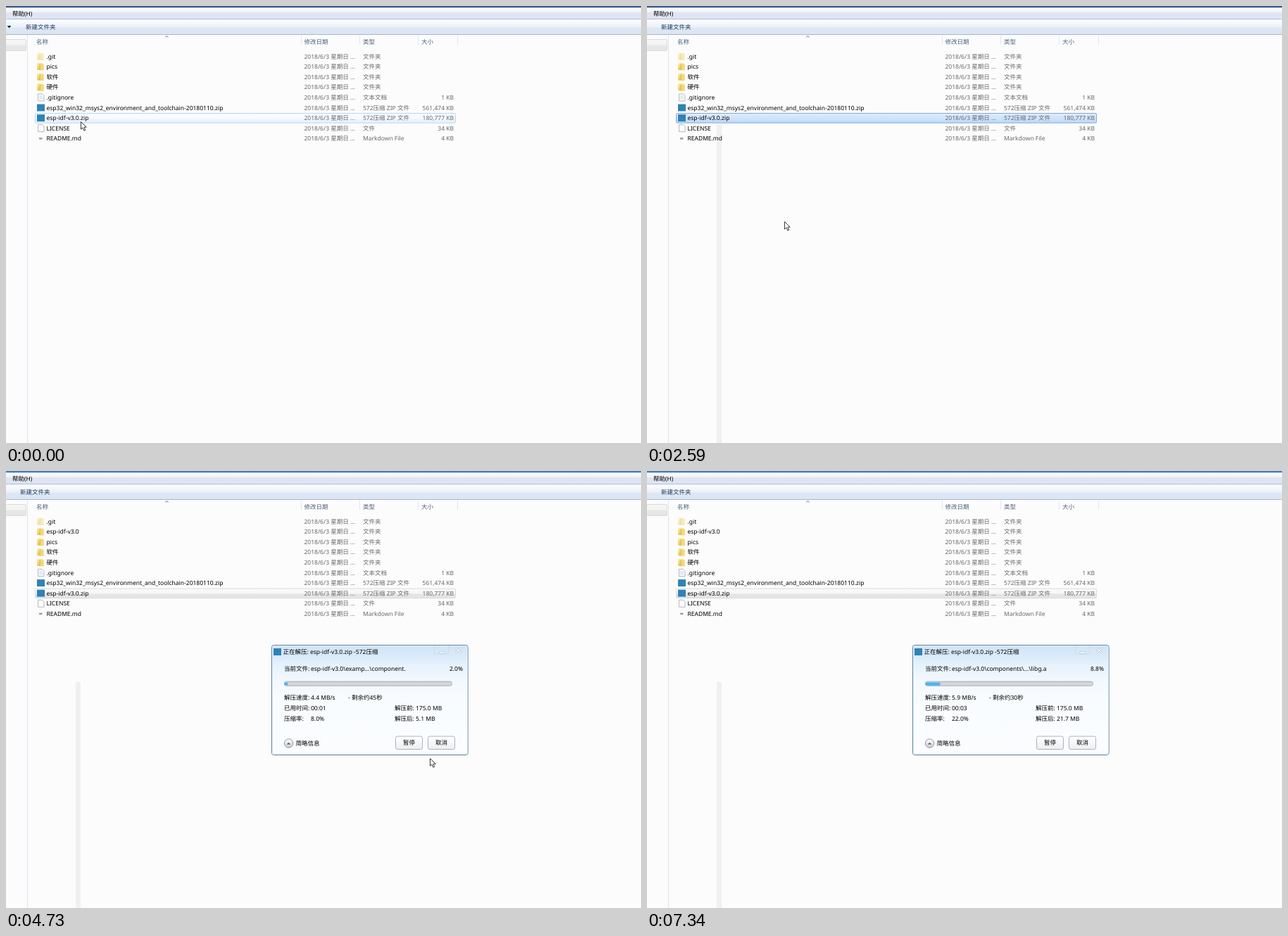
Animation, 902 px wide and 621 px high, one loop 7440 ms. Source, as an HTML page:

```html
<!DOCTYPE html>
<html lang="zh-CN">
<head>
<meta charset="utf-8">
<title>解压演示</title>
<style>
html, body { margin: 0; width: 100%; height: 100%; overflow: hidden; background: #fcfcfc; }
svg { display: block; }
text {
  font: 8.5px 'Noto Sans', 'Noto Sans CJK SC', 'Noto Sans CJK', sans-serif;
  text-rendering: geometricPrecision; white-space: pre; fill: #000;
}
.meta { fill: #686868; }
.head { fill: #4c607a; }
.bar { fill: #1e395b; }
.medium { font-weight: 500; }
.bold { font-weight: 700; }
</style>
</head>
<body>
<svg id="stage" width="902" height="621" viewBox="0 0 902 621"></svg>
<script>
const LOOP = 7440;
const ROW = 14.6;

// Drawing helpers; text is placed by its vertical centre.
const text = (x, y, s, attrs = '') => `<text x="${x}" y="${y + 3.1}" ${attrs}>${s}</text>`;
const rect = (x, y, w, h, fill, attrs = '') =>
  `<rect x="${x}" y="${y}" width="${w}" height="${h}" fill="${fill}" ${attrs}/>`;
const box = (x, y, w, h, fill, stroke, r = 0, attrs = '') =>
  rect(x + .5, y + .5, w - 1, h - 1, fill, `stroke="${stroke}" rx="${r}" ${attrs}`);
const disc = (x, y, r, fill, attrs = '') => `<circle cx="${x}" cy="${y}" r="${r}" fill="${fill}" ${attrs}/>`;
const path = (d, fill, attrs = '') => `<path d="${d}" fill="${fill}" ${attrs}/>`;
const group = (id, body) => `<g id="${id}">${body}</g>`;
const gradient = (id, ...stops) =>
  `<linearGradient id="${id}" x2="0" y2="1">${stops.map(([at, color]) =>
    `<stop offset="${at}" stop-color="${color}"/>`).join('')}</linearGradient>`;

const defs = '<defs>' +
  gradient('activeEdge', [0, '#4a74ab'], [.6, '#2c4d7e'], [1, '#56749f']) +
  gradient('idleEdge', [0, '#4f8acb'], [.6, '#3a74b8'], [1, '#6b95c6']) +
  gradient('menubar', [0, '#fcfdff'], [.35, '#f1f3fa'], [.5, '#dfe4f2'], [1, '#dfe5f3']) +
  gradient('toolbar', [0, '#fafcfe'], [.48, '#e9f0f9'], [.52, '#dee8f5'], [1, '#dce6f3']) +
  gradient('nav', [0, '#f8f8f8'], [.5, '#f1f1f1'], [.52, '#e7e7e7'], [1, '#e6e6e6']) +
  gradient('hover', [0, '#fbfdff'], [.55, '#f6fafe'], [.65, '#ebf4fd'], [1, '#e8f2fd']) +
  gradient('chosen', [0, '#dfedfd'], [1, '#bfd9fb']) +
  gradient('dull', [0, '#fafafa'], [.5, '#f6f6f6'], [.6, '#e4e4e4'], [1, '#e5e5e5']) +
  gradient('folder', [0, '#fbeaa0'], [1, '#e7c34e']) +
  gradient('dialogFill', [0, '#cfe4f6'], [.1, '#d9ebfa'], [.18, '#e6f2fc'], [.32, '#f2f8fe'], [.5, '#f9fcff'], [1, '#fbfdff']) +
  gradient('track', [0, '#c6cacd'], [.5, '#d8dadc'], [1, '#cdd0d2']) +
  gradient('fill', [0, '#9fd6f8'], [.5, '#4aa9e8'], [1, '#6cc1f4']) +
  gradient('button', [0, '#ffffff'], [1, '#eceff2']) +
  gradient('knob', [0, '#ffffff'], [1, '#c9cdd1']) + '</defs>';

const icons = {
  folder: y => rect(44.3, y - 5, 8.5, 10, 'url(#folder)', 'rx=".6"') +
    rect(48.3, y - 3.5, 5.5, 9, '#f3d878', 'rx=".6"') + rect(47.7, y - 4, .8, 9, '#d3ab48'),
  pale: y => `<g opacity=".5">${icons.folder(y)}</g>`,
  page: y => path(`M45.5 ${y - 5}h6l2.5 2.5v7.5h-8.5z`, '#fff', 'stroke="#a2a6aa" stroke-width=".8"'),
  lines: y => icons.page(y) + path(`M47 ${y - 2}h4.5m-4.5 2h5.5m-5.5 2h5.5`, 'none', 'stroke="#b9c4cc" stroke-width=".7"'),
  zip: y => rect(44, y - 5, 11, 10, '#2f83b5'),
  note: y => rect(47, y - 1.2, 4.5, 2.4, '#9c9c9c')
};

const ARCHIVE = '572压缩 ZIP 文件';
const extracted = ['folder', 'esp-idf-v3.0', '文件夹', ''];
const files = [
  ['pale', '.git', '文件夹', ''],
  ['folder', 'pics', '文件夹', ''],
  ['folder', '软件', '文件夹', ''],
  ['folder', '硬件', '文件夹', ''],
  ['lines', '.gitignore', '文本文档', '1 KB'],
  ['zip', 'esp32_win32_msys2_environment_and_toolchain-20180110.zip', ARCHIVE, '561,474 KB'],
  ['zip', 'esp-idf-v3.0.zip', ARCHIVE, '180,777 KB'],
  ['page', 'LICENSE', '文件', '34 KB'],
  ['note', 'README.md', 'Markdown File', '4 KB']
];
const fileList = rows => rows.map(([icon, name, kind, size], i) => {
  const y = 71.5 + i * ROW;
  return icons[icon](y) + text(57.5, y, name) + text(423.5, y, '2018/6/3 星期日 ...', 'class="meta"') +
    text(507, y, kind, 'class="meta"') + text(636, y, size, 'class="meta" text-anchor="end"');
}).join('');
const highlight = (id, row, fill, stroke) =>
  group(id, box(41, 64.4 + row * ROW, 598, ROW, `url(#${fill})`, stroke, 1.5));

const chrome =
  group('activeTitle', rect(0, 0, 902, 2.6, 'url(#activeEdge)')) +
  group('idleTitle', rect(0, 0, 902, 2.6, 'url(#idleEdge)')) +
  rect(0, 2.5, 902, 15.5, 'url(#menubar)') + rect(0, 18, 902, 1, '#b5bfd3') +
  rect(0, 19, 902, 2, '#f4f7fb') + rect(0, 21, 902, 19, 'url(#toolbar)') + rect(0, 40, 902, 1, '#a5b6cc') +
  text(9, 11, '帮助(H)') +
  group('wideBar', path('M1.5 28h6l-3 3.4z', '#1e2f45') + text(28, 30, '新建文件夹', 'class="bar"')) +
  group('slimBar', text(20, 30, '新建文件夹', 'class="bar"')) +
  box(-2, 47, 31, 17, 'url(#nav)', '#dadada', 1.5) + rect(30, 41, 1, 580, '#d9e5f3') +
  [419, 502, 585, 641].map(x => rect(x, 42, 1, 13, '#e1e7ee')).join('') +
  path('M226.5 44.5l2-2 2 2', 'none', 'stroke="#56636f"') +
  [[43, '名称'], [423.5, '修改日期'], [507, '类型'], [590, '大小']]
    .map(([x, s]) => text(x, 50.5, s, 'class="head"')).join('');

const square = color => y => rect(111, y - 5, 11, 10, color);
const round = color => y => disc(116, y, 5.6, color);
const zip = square('#2f83b5'), compare = round('#555'), guard = round('#8cc92b');
const SEPARATOR = null;
const menuItems = [
  ['打开(O)'], ['用记事本打开该文件'], ['管理员取得所有权'],
  ['Open with Dovu', square('#1f7fcb')], ['使用VuPost发送', round('#3a9be0')], SEPARATOR,
  ['用572压缩打开(Q)', zip], [''], ['解压到当前文件夹(X)', zip], ['解压到 esp-idf-v3.0\\ (E)', zip], SEPARATOR,
  ['打开方式(H)...'], SEPARATOR,
  ['共享(H)', , true], SEPARATOR,
  ['比较选定项目', compare], SEPARATOR,
  ['使用 572解除占用', square('#efc647')], ['使用 572强力删除', square('#8f86e6')],
  ['使用 572进行木马云查杀', guard], ['使用 572管理右键菜单', guard], SEPARATOR,
  ['手动选择项目', compare, true], ['还原以前的版本(V)'], SEPARATOR,
  ['发送到(N)', , true], SEPARATOR,
  ['剪切(T)'], ['复制(C)'], ['粘贴(P)'], SEPARATOR,
  ['创建快捷方式(S)'], ['删除(D)'], ['重命名(M)'], SEPARATOR,
  ['属性(R)']
];
function contextMenu() {
  let y = 173.2;
  const rows = menuItems.map(item => {
    if (!item) {
      y += 5.4;
      return rect(129, y - 10.6, 130, 1, '#dedfdf');
    }
    const [label, icon, more] = item;
    const row = (icon ? icon(y) : '') + text(130.5, y, label, y < 174 ? 'class="bold"' : '') +
      (more ? path(`M250 ${y - 2.5}v5l3-2.5z`, '#111') : '');
    y += 15.4;
    return row;
  }).join('');
  const glow = (id, top) => group(id, box(109, top, 151, 15, '#e5eef9', '#aecff7', 1.5));
  return box(106.3, 163.5, 155.2, 470, '#f1f1f1', '#979797') + rect(127, 165, 1, 456, '#e6e6e6') +
    rect(128, 165, 1, 456, '#f8f8f8') + glow('glowFirst', 166) + glow('glowExtract', 294) + rows;
}

const value = (id, x, y, attrs) => text(x, y, '', `id="${id}" ${attrs || ''}`);
const button = (x, label) => box(x, 376.5, 39, 19.5, 'url(#button)', '#a9b3bc', 2.5) +
  text(x + 19.5, 386, label, 'class="medium" text-anchor="middle"');
const dialog =
  box(377, 247, 279.6, 157, 'url(#dialogFill)', '#56809f', 3) +
  box(378, 248, 277.6, 155, 'none', '#f4faff', 2, 'opacity=".7"') +
  rect(380, 252, 11, 10, '#2f83b5') + text(393.5, 257, '正在解压: esp-idf-v3.0.zip -572压缩', 'fill="#33404c"') +
  path('M608.5 248v10q0 2 2 2h16q2 0 2-2v-10', 'none', 'stroke="#c3d8e9" stroke-width=".8"') +
  rect(615, 257, 8, 2.4, '#fff', 'stroke="#a7b7c4" stroke-width=".6"') +
  path('M639 252l7 6m0-6l-7 6', 'none', 'stroke="#a7b7c4" stroke-width="2.6"') +
  path('M639 252l7 6m0-6l-7 6', 'none', 'stroke="#fff" stroke-width="1.4"') +
  box(395, 298.6, 239, 7.2, 'url(#track)', '#b2b6b9', 3) +
  rect(395.5, 299.2, 1, 6, 'url(#fill)', 'id="bar" rx="2"') +
  [[395, 281, '当前文件:'], [395, 321.5, '解压速度:'], [395, 337, '已用时间:'], [395, 352.3, '压缩率:'],
    [552, 337, '解压前:'], [552, 352.3, '解压后:'], [582, 337, '175.0 MB']].map(a => text(...a)).join('') +
  value('file', 433, 281) + value('percent', 649, 281, 'text-anchor="end"') + value('speed', 433, 321.5) +
  value('left', 486, 321.5) + value('elapsed', 433, 337) + value('ratio', 433, 352.3) + value('after', 582, 352.3) +
  group('controls', disc(401.5, 387, 6.2, 'url(#knob)', 'stroke="#8e969d"') +
    path('M398.5 388.5l3-2.5 3 2.5z', '#555') + text(411.5, 387, '简略信息', 'class="medium"') +
    button(553, '暂停') + button(599, '取消'));

const pointer = group('pointer',
  path('M.5 .5v10.6l2.5-2.2 1.8 4.2 1.9-.8-1.8-4.1h3.3z', '#fff', 'stroke="#222" stroke-width=".9"') +
  group('busy', disc(9.5, .5, 4.5, 'none', 'stroke="#8fdcdc" stroke-width="2"') +
    path('M5 .5A4.5 4.5 0 0 1 13 -2.3M6.3 3.7A4.5 4.5 0 0 0 12 4.2', 'none', 'stroke="#1f9d9d" stroke-width="1.8"')));

document.getElementById('stage').innerHTML = defs + rect(0, 0, 902, 621, '#fcfcfc') + chrome +
  rect(99, 168, 7, 453, '#f0f0f0', 'id="strip"') +
  highlight('rowHover', 6, 'hover', '#b8d6f5') + highlight('rowChosen', 6, 'chosen', '#82a9d6') +
  highlight('rowDull', 6, 'dull', '#d9d9d9') + highlight('rowMoved', 7, 'dull', '#d9d9d9') +
  group('listBefore', fileList(files)) +
  group('listAfter', fileList([files[0], extracted, ...files.slice(1)])) +
  group('menu', contextMenu()) + group('dialog', dialog) + pointer;

const el = id => document.getElementById(id);

// Visible spans: element, from, until.
const spans = [
  ['activeTitle', 0, 3330], ['idleTitle', 3330, LOOP],
  ['wideBar', 0, 310], ['slimBar', 310, LOOP],
  ['rowHover', 0, 310], ['rowChosen', 310, 3330], ['rowDull', 3330, 4070], ['rowMoved', 4070, LOOP],
  ['listBefore', 0, 4070], ['listAfter', 4070, LOOP],
  ['strip', 1170, LOOP], ['menu', 1170, 2590], ['glowFirst', 1350, 1600], ['glowExtract', 2090, 2590],
  ['dialog', 3470, LOOP], ['controls', 4010, LOOP], ['busy', 2770, 3330], ['pointer', 0, 6430]
].map(([id, from, until]) => [el(id), from, until]);

// Pointer stops: time, x, y.
const stops = [
  [0, 106, 164], [90, 106, 163], [920, 99, 156], [1170, 106, 163], [1350, 107, 165],
  [1600, 126, 203], [1690, 154, 252], [1780, 178, 293], [1850, 189, 307], [1940, 195, 310], [2090, 195, 308], [2180, 195, 306],
  [2770, 214, 305], [2840, 262, 302], [2920, 318, 297], [2990, 352, 291], [3060, 368, 288],
  [3330, 372, 288], [4070, 375, 291],
  [4210, 398, 303], [4310, 452, 334], [4420, 515, 368], [4520, 564, 393], [4630, 592, 405], [4730, 602, 408],
  [5430, 684, 432], [5580, 833, 582]
];

// Progress: time, percent, file, speed, time left, ratio, unpacked size.
const progress = [
  [3470, 0, '', '0 B/s', '', '0.0%', '0 B'],
  [4010, 0, 'example...\\tcp_perf.h', '354.9 KB/s', '11分钟', '34.9%', '116.0 KB'],
  [4210, .2, 'examp...\\main.c', '912.4 KB/s', '4分钟', '21.6%', '574.2 KB'],
  [4310, .5, 'examp...\\Makefile', '1.6 MB/s', '2分钟', '15.3%', '1.3 MB'],
  [4420, .9, 'examp...\\sdkconfig', '2.5 MB/s', '1分钟20秒', '11.2%', '2.3 MB'],
  [4520, 1.3, 'examp...\\README.md', '3.3 MB/s', '1分钟', '9.4%', '3.4 MB'],
  [4630, 1.7, 'examp...\\Makefile', '4.0 MB/s', '50秒', '8.5%', '4.4 MB'],
  [4730, 2, 'examp...\\component.', '4.4 MB/s', '45秒', '8.0%', '5.1 MB'],
  [4960, 2.1, 'examp...\\app_main.c', '3.8 MB/s', '55秒', '9.3%', '5.4 MB'],
  [5060, 2.2, 'examp...\\Kconfig', '3.6 MB/s', '58秒', '10.2%', '5.6 MB'],
  [5160, 2.2, 'examp...\\Makefile', '3.4 MB/s', '1分钟5秒', '10.9%', '5.7 MB'],
  [5260, 2.3, 'examp...\\README.md', '3.2 MB/s', '1分钟10秒', '11.6%', '5.8 MB'],
  [5430, 2.3, 'examp...\\README.md', '3.0 MB/s', '1分钟15秒', '11.6%', '5.8 MB'],
  [5700, 2.4, 'examp...\\main.c', '2.7 MB/s', '1分钟25秒', '13.2%', '6.1 MB'],
  [6430, 2.5, 'examples\\README.m', '2.2 MB/s', '1分钟45秒', '14.6%', '6.3 MB'],
  [6520, 3.1, 'components\\...\\phy.h', '2.6 MB/s', '1分钟26秒', '16.1%', '7.8 MB'],
  [6600, 3.9, 'components\\...\\libc.a', '3.2 MB/s', '1分钟8秒', '17.4%', '9.8 MB'],
  [6690, 4.8, 'components\\...\\libc.a', '3.8 MB/s', '54秒', '18.5%', '12.0 MB'],
  [6770, 5.5, 'components\\...\\libm.a', '4.3 MB/s', '46秒', '19.3%', '13.7 MB'],
  [6860, 6.2, 'components\\...\\libm.a', '4.7 MB/s', '41秒', '20.1%', '15.4 MB'],
  [7010, 7.1, 'components\\...\\libpp.a', '5.1 MB/s', '37秒', '20.8%', '17.6 MB'],
  [7090, 7.7, 'components\\...\\libpp.a', '5.4 MB/s', '34秒', '21.2%', '19.0 MB'],
  [7180, 8.2, 'components\\...\\libg.a', '5.6 MB/s', '32秒', '21.6%', '20.3 MB'],
  [7340, 8.8, 'components\\...\\libg.a', '5.9 MB/s', '30秒', '22.0%', '21.7 MB']
];
const clock = [[0, '00:00'], [4520, '00:01'], [5580, '00:02'], [6520, '00:03']];

const current = (table, t) => table.filter(row => row[0] <= t).pop();
const write = (id, s) => { if (el(id).textContent !== s) el(id).textContent = s; };

function draw(t) {
  for (const [node, from, until] of spans) node.style.display = t >= from && t < until ? '' : 'none';

  const [, x, y] = current(stops, t);
  el('pointer').setAttribute('transform', `translate(${x} ${y})`);

  const top = t < 3330 ? 168 : 300;
  el('strip').setAttribute('y', top);
  el('strip').setAttribute('height', 621 - top);

  const state = current(progress, t);
  if (!state) return;
  const [, percent, file, speed, left, ratio, after] = state;
  write('file', file && 'esp-idf-v3.0\\' + file);
  write('percent', percent.toFixed(1) + '%');
  write('speed', speed);
  write('left', left && '- 剩余约' + left);
  write('elapsed', current(clock, t)[1]);
  write('ratio', ratio);
  write('after', after);
  el('bar').setAttribute('width', Math.max(1.5, percent * 2.39));
}

const start = performance.now();
function tick() {
  draw((performance.now() - start) % LOOP);
  requestAnimationFrame(tick);
}
tick();
</script>
</body>
</html>
```
